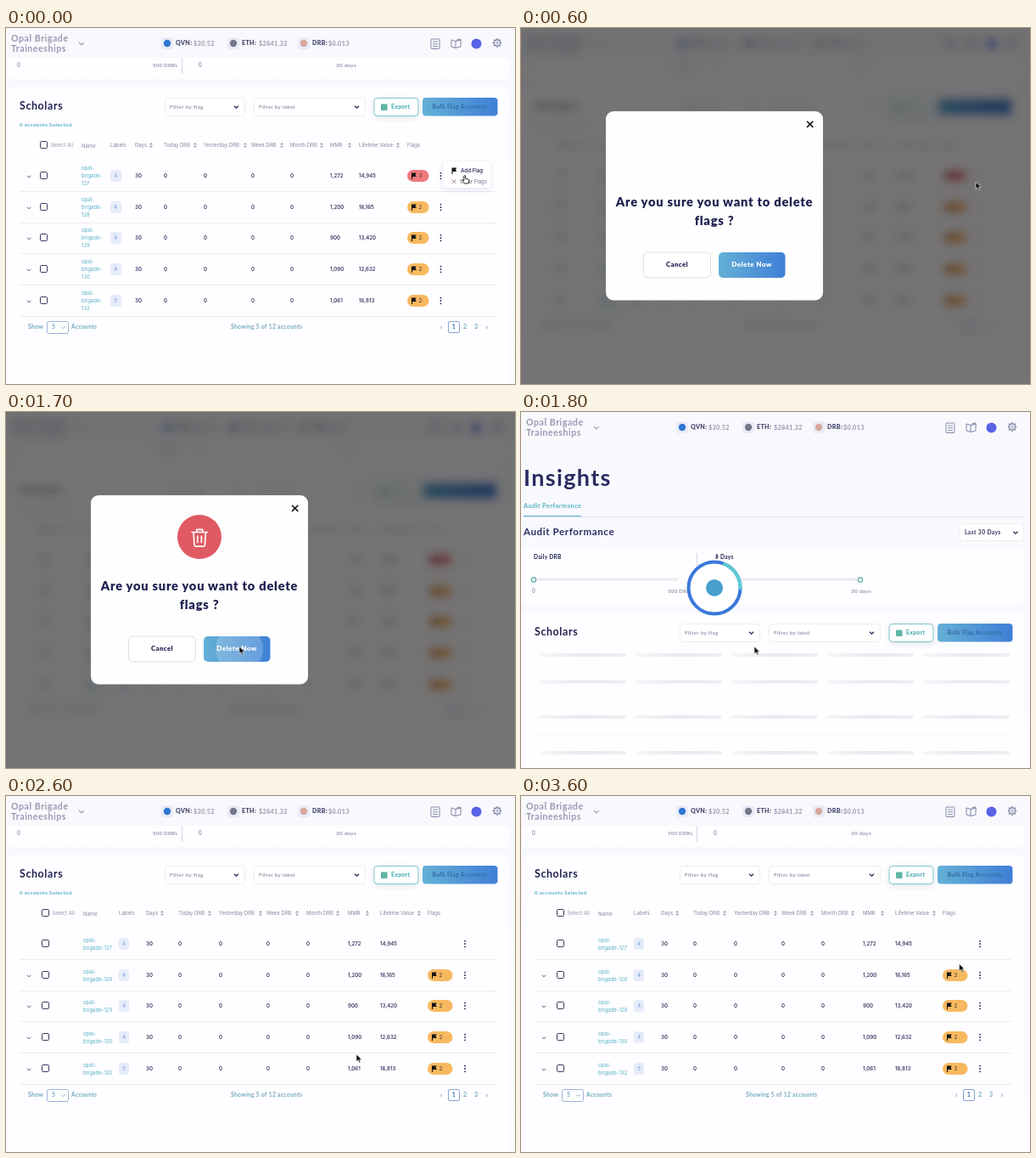
An HTML page for the animation above (3.7 s loop, 600 by 419 pixels).

```html
<!DOCTYPE html>
<html lang="en">
<head>
<meta charset="utf-8">
<title>Flag manager</title>
<style>
html, body { margin: 0; width: 100%; height: 100%; overflow: hidden; background: #fcfbff; }
svg { display: block; width: 600px; height: 419px; }
text { font-family: Inter, "Noto Sans", sans-serif; }
.h { font-family: Lato, "Open Sans", sans-serif; letter-spacing: .05em; }
</style>
</head>
<body>
<svg id="stage" viewBox="0 0 600 419"></svg>
<script>
const NAVY = '#1f2150', GRAY = '#9697ae', TEAL = '#55b2c6', PALE = '#ededf3';
const LOOP = 3700, STEP = 100, SCROLL = 167;

// Drawing helpers; text is centred vertically on y.
const text = (x, y, s, size, fill = NAVY, weight = 400, anchor = 'start', cls = '') =>
  `<text x="${x}" y="${y + size * 0.35}" font-size="${size}" fill="${fill}" font-weight="${weight}" text-anchor="${anchor}" class="${cls}">${s}</text>`;
const head = (x, y, s, size, fill, weight = 700, anchor) => text(x, y, s, size, fill, weight, anchor, 'h');
const rect = (x, y, w, h, r, fill, more = '') =>
  `<rect x="${x}" y="${y}" width="${w}" height="${h}" rx="${r}" fill="${fill}" ${more}/>`;
const circle = (x, y, r, fill, more = '') => `<circle cx="${x}" cy="${y}" r="${r}" fill="${fill}" ${more}/>`;
const line = (d, stroke, width = 1, more = '') =>
  `<path d="${d}" fill="none" stroke="${stroke}" stroke-width="${width}" ${more}/>`;
const shape = (d, fill) => `<path d="${d}" fill="${fill}"/>`;
const group = (id, body, more = '') => `<g id="${id}" ${more}>${body}</g>`;
const chevron = (x, y, color = NAVY, w = 2.5, thick = 1.2) =>
  line(`M${x - w} ${y - w / 2}l${w} ${w}l${w} ${-w}`, color, thick);
const flag = (x, y) => shape(`M${x} ${y - 3.5}h5.8l-1.3 2.2 1.3 2.2h-4.7v3h-1.1z`, '#161616');
const box = (x, y) => rect(x - 4, y - 4, 8, 8, 1, '#fff', 'stroke="#3b3c60"');
const dots = (x, y) => [-3.3, 0, 3.3].map(d => circle(x, y + d, 0.9, NAVY)).join('');
const cross = (x, y, r, color, width) =>
  line(`M${x - r} ${y - r}l${2 * r} ${2 * r}m0 ${-2 * r}l${-2 * r} ${2 * r}`, color, width);

const defs = `<defs>
  <linearGradient id="bg" x2="0" y2="1"><stop stop-color="#f7f8fd"/><stop offset="1" stop-color="#fcfbff"/></linearGradient>
  <linearGradient id="blue"><stop stop-color="#64b0d6"/><stop offset="1" stop-color="#3f7fd6"/></linearGradient>
  <linearGradient id="bone"><stop stop-color="#f6f5f9"/><stop offset=".5" stop-color="#e9e8ee"/><stop offset="1" stop-color="#efeef3"/></linearGradient>
  <filter id="blur" filterUnits="userSpaceOnUse" x="-20" y="-20" width="640" height="459"><feGaussianBlur stdDeviation="5.5"/></filter>
  <filter id="soft" x="-30%" y="-30%" width="160%" height="180%"><feDropShadow dx="0" dy="2" stdDeviation="3" flood-color="#4a4a80" flood-opacity=".14"/></filter>
  <clipPath id="press">${rect(233, 264, 78, 30, 5, '#fff')}</clipPath>
</defs>`;

function topBar() {
  const coin = (x, color, name, price, px) =>
    rect(x - 7, 11, 14, 14, 3, '#e9ecf6') + circle(x, 18, 4.2, color) +
    head(x + 10, 18, name + ':', 7.1, '#4a4b72', 900) + head(px, 18, price, 7.2, GRAY);
  const icon = '#8587a8';
  let gear = circle(579, 17.5, 3.6, 'none', `stroke="${icon}" stroke-width="1.1"`) +
    circle(579, 17.5, 1.4, 'none', `stroke="${icon}" stroke-width=".8"`);
  for (let a = 0; a < 360; a += 45)
    gear += line('M579 12.2v1.9', icon, 1.8, `transform="rotate(${a} 579 17.5)"`);
  return rect(0, 0, 600, 35, 0, '#f8f8fd') +
    head(6, 12, 'Opal Brigade', 10.6, '#9a9bb2') + head(6, 24, 'Traineeships', 10.6, '#9a9bb2') +
    chevron(89, 18.5, GRAY, 2.8) +
    coin(190, '#2f78d2', 'QVN', '$30.52', 221) +
    coin(268, '#77788a', 'ETH', '$2841.32', 298) +
    coin(351, '#d9a9a0', 'DRB', '$0.013', 380) +
    rect(501, 13, 10, 11.5, 1, 'none', `stroke="${icon}"`) +
    line('M503 16h6m-6 2.7h6m-6 2.7h6', icon, 0.9) +
    line('M530 15.5l-5-1.5v8l5 1.5 6-1.5v-8zv8m2-8v-2l4-.5v2', icon, 1) +
    circle(554.5, 18.5, 6, '#5a62e6') + gear;
}

function insights() {
  const track = x => rect(x, 195.5, 167, 3, 1.5, '#ebebf0');
  const knob = x => circle(x, 197.5, 2.6, '#fff', 'stroke="#57aaa8" stroke-width="1.2"');
  return head(3, 78, 'Insights', 27, '#2a2b61') +
    head(3, 110, 'Audit Performance', 7.4, TEAL) +
    line('M3 123.5H593', '#e3e6f1') + line('M3 122.5H71', TEAL) +
    head(3, 141, 'Audit Performance', 11.6, '#2a2b61') +
    rect(517.5, 131.5, 75, 20, 4, '#fff', `stroke="${PALE}"`) +
    head(523, 142, 'Last 30 Days', 6.8, '#34365f') + chevron(583, 142) +
    rect(2, 160, 591, 67, 4, '#fefdff') +
    head(15, 171, 'Daily DRB', 6.5, NAVY) + head(229, 171, '# Days', 6.5, NAVY) +
    line('M207.5 166V221', '#d5d6e0') +
    track(18) + track(232) + rect(390, 195.5, 8, 3, 1, '#ebebf0') + knob(15) + knob(400) +
    head(13, 211, '0', 6.5, GRAY) + head(173, 211, '500 DRBs', 6, GRAY) +
    head(227, 211, '0', 6.5, GRAY) + head(389, 211, '30 days', 6.4, GRAY);
}

function toolbar() {
  const filter = (x, w, s) => rect(x + 0.5, 82.5, w, 21, 4, '#fff', `stroke="${PALE}"`) +
    head(x + 6, 93, s, 6.4, GRAY) + chevron(x + w - 9.5, 93);
  return rect(2, 69, 591, 420, 5, '#fefdff') +
    head(16, 92, 'Scholars', 12.4, NAVY) +
    filter(187, 94, 'Filter by flag') + filter(292, 131, 'Filter by label') +
    rect(434, 82.5, 52, 21, 4, '#fff', 'stroke="#7fc6c8" filter="url(#soft)"') +
    rect(442, 89.5, 7.5, 7.5, 1, '#5fb5a5') + head(454, 93, 'Export', 6.7, '#5cb3b9', 900) +
    rect(491, 82, 88.5, 21.5, 4, 'url(#blue)') +
    head(535, 93, 'Bulk Flag Accounts', 6.9, '#3a72ab', 900, 'middle');
}

const LABELS = ['Labels', 'Days', 'Today DRB', 'Yesterday DRB', 'Week DRB', 'Month DRB', 'MMR', 'Lifetime Value', 'Flags'];
const SORT_AT = [0, 19, 37, 49, 36, 37, 23, 46, 0];
const ROWS = [
  ['127', 4, '1,272', '14,945', 3], ['128', 4, '1,200', '16,165', 2], ['129', 4, '900', '13,420', 2],
  ['130', 4, '1,090', '12,632', 2], ['132', 5, '1,061', '16,813', 2]];

// wide: two-line names and larger flags; otherwise the narrow layout beside the row menu.
function table(wide) {
  const cols = wide ? [133, 165, 203, 251, 307, 354, 403, 441, 497] : [123, 152, 186, 233, 289, 335, 382, 416, 473];
  const boxX = wide ? 46.5 : 44.5, nameX = wide ? 91 : 89, dotX = wide ? 541 : 512.5;
  const label = '#85879f';
  let out = head(16, 114, '0 accounts Selected', 6.3, TEAL) + box(boxX, 137.5) +
    text(boxX + 8, 138, 'Select All', 6, GRAY) + text(nameX, 139, 'Name', 6, label);
  LABELS.forEach((s, i) => {
    const x = cols[i], sx = x + SORT_AT[i];
    out += text(x, 138, s, 6, label);
    if (SORT_AT[i]) out += shape(`M${sx - 2} 137.3l2-2.3 2 2.3zm0 1.4l2 2.3 2-2.3z`, GRAY);
  });
  ROWS.forEach(([id, labels, mmr, total, flags], i) => {
    const y = Math.round(174 + 36.7 * i);
    const name = wide ? ['opal-', 'brigade-' + id] : ['opal-', 'brigade-', id];
    const first = i === 0;
    if (!wide || !first) out += chevron(27, y + 0.8, '#55577a', 2.1, 1);
    out += box(boxX, y - 0.5);
    name.forEach((s, k) => out += text(nameX, y + (k - (name.length - 1) / 2) * 9, s, 6, TEAL));
    out += rect(cols[0], y - 7, wide ? 12 : 13, 14, 3, '#e6ecfa') +
      text(cols[0] + 6.2, y, labels, 6, '#6d97d8', 400, 'middle');
    ['30', '0', '0', '0', '0', mmr, total].forEach((s, k) => out += text(cols[k + 1], y, s, 6.2, NAVY, 500));
    const pill = rect(cols[8], y - 7, wide ? 29.5 : 25.5, 14, 7, first ? '#ee7a7f' : '#f7b95f') +
      flag(cols[8] + 5, y) + text(cols[8] + 13.5, y, flags, 6.5, '#3b3040');
    out += wide && first ? group('firstPill', pill) : pill;
    out += dots(dotX, y) + (i < 4 ? line(`M16 ${y + 18.5}H578`, '#f0eaf1') : '');
  });
  const foot = '#6fa6bf';
  return out + line('M16 339.5H578', '#efebf2') +
    head(26, 352, 'Show', 6.8, foot) + rect(48.5, 345.5, 25, 14, 2, '#fff', 'stroke="#9db3d9"') +
    head(54, 352, '5', 6.8, foot) + chevron(67.5, 352.5, foot, 2.2, 0.9) + head(77, 352, 'Accounts', 6.7, foot) +
    head(265, 352, 'Showing 5 of 12 accounts', 6.7, foot) +
    head(512, 352, '‹', 9, foot) + rect(521.5, 345.5, 13, 13, 1.5, '#fff', 'stroke="#7fa2d4"') +
    head(528, 352, '1', 7, '#3e6fb8', 700, 'middle') + head(539, 352, '2', 7, foot) +
    head(552, 352, '3', 7, foot) + head(565.5, 352, '›', 9, foot);
}

function skeleton() {
  let out = '';
  [286, 317.5, 359, 401].forEach((y, i) => {
    for (let k = 0; k < 5; k++) out += rect(22 + 113 * k, y - 2, 102, 4, 2, 'url(#bone)');
    out += line(`M16 ${[298.5, 338.5, 380.5, 418.5][i]}H578`, '#f9f7fb');
  });
  return out;
}

const menu = rect(516, 157, 55, 31, 3, '#fff', 'filter="url(#soft)"') +
  flag(525.5, 168) + text(536, 167.5, 'Add Flag', 6.2, NAVY, 500) +
  group('clear', line('M525.5 178.2l5 5m0-5l-5 5', '#d3545b', 1, 'id="clearMark"') +
    text(535, 181, 'Clear Flags', 6, 'currentColor'));

const trash = circle(228, 147, 26, '#df5a62') +
  line('M219 141.5h18.5m-12.7 0v-3.2h7v3.2m-10.8 0l1 15q.1 1.7 2 1.7h8.4q1.9 0 2-1.7l1-15m-9.6 4.5v7.5m4.6-7.5v7.5',
    '#fff', 1.7, 'stroke-linecap="round" stroke-linejoin="round"');

const modal = rect(0, 0, 600, 419, 0, '#000', 'opacity=".54"') +
  rect(100, 98, 256, 222.5, 9, '#fffeff') + cross(340.7, 113.3, 3.6, '#111', 1.6) +
  group('trash', trash) +
  head(228, 205, 'Are you sure you want to delete', 14.7, NAVY, 900, 'middle') +
  head(228, 226.5, 'flags ?', 14.7, NAVY, 900, 'middle') +
  rect(144.5, 264, 79, 30, 5, '#fff', 'stroke="#dddde6"') + head(184, 278.5, 'Cancel', 7.8, NAVY, 900, 'middle') +
  rect(233, 264, 78.5, 30, 5, 'url(#blue)') +
  `<g clip-path="url(#press)">${circle(275, 279, 0, '#fff', 'id="ripple" opacity=".2"')}</g>` +
  head(272, 278.5, 'Delete Now', 8.1, '#fff', 900, 'middle');

const loader = circle(228, 207, 33, '#fff') +
  circle(228, 207, 30.5, 'none', 'stroke="#3a78dc" stroke-width="4"') +
  group('arc', line('M238.4 178.3A30.5 30.5 0 0 1 258.5 209', '#60cad2', 4)) +
  circle(228, 207, 10, '#479fce');

const arrow = '<path id="arrow" d="M0 0v8.6l2-1.8 1.5 3.1 1.5-.7-1.4-3h2.8z" fill="#111" stroke="#fff" stroke-width=".6"/>';
const hand = '<path id="hand" d="M-1.2-4q1-1 1.8 0v3.2l3.5.8q1 .3.8 1.6l-.7 3.4h-4.7l-2.9-3.4q.2-1.2 1.3-.6l.9.7z" fill="#fff" stroke="#111" stroke-width=".9"/>';

document.getElementById('stage').innerHTML = defs + group('page',
  rect(-20, -20, 640, 459, 0, 'url(#bg)') +
  group('content', insights() + group('sheet', toolbar() + group('narrow', table(false) + menu) +
    group('wide', table(true)), `transform="translate(0 ${SCROLL})"`) + group('skeleton', skeleton())) +
  topBar()) + group('modal', modal) + group('loader', loader) + arrow + hand;

const $ = id => document.getElementById(id);
const show = (id, on) => $(id).style.display = on ? '' : 'none';
const clamp = v => Math.max(0, Math.min(1, v));

// Pointer path: time, x, y
const PATH = [
  [0, 541, 178], [200, 540, 180], [500, 537.5, 185.5], [600, 536, 181], [700, 530, 184], [1300, 277, 277],
  [1500, 275, 276], [1800, 275, 276], [2600, 413, 304], [2900, 97, 341], [3100, 97, 341], [3600, 516.5, 197.5]];

function pointer(t) {
  const i = PATH.findIndex(p => p[0] > t);
  if (i < 0) return PATH[PATH.length - 1].slice(1);
  const [t0, x0, y0] = PATH[i - 1], [t1, x1, y1] = PATH[i];
  const k = (t - t0) / (t1 - t0), e = k * k * (3 - 2 * k);
  return [x0 + (x1 - x0) * e, y0 + (y1 - y0) * e];
}

function draw(now) {
  const t = Math.floor(now % LOOP / STEP) * STEP;
  const asking = t >= 600 && t < 1800, loading = t >= 1800 && t < 2500;
  show('narrow', t < 600);
  show('wide', t >= 600 && !loading);
  show('firstPill', asking);
  show('skeleton', loading);
  show('loader', loading);
  show('modal', asking);
  $('content').setAttribute('transform', `translate(0 ${loading ? 0 : -SCROLL})`);
  asking ? $('page').setAttribute('filter', 'url(#blur)') : $('page').removeAttribute('filter');

  const hover = t >= 200;
  $('clear').style.color = hover ? '#3f83b8' : '#6c7090';
  $('clearMark').setAttribute('stroke', hover ? '#d3545b' : '#a08080');

  const pop = 1 - (1 - clamp((t - 600) / 400)) ** 3;
  $('trash').setAttribute('transform', `translate(228 147) scale(${pop}) translate(-228 -147)`);
  $('ripple').setAttribute('r', 28 * clamp((t - 1500) / 200));
  $('arc').setAttribute('transform', `rotate(${(t - 1800) * 0.24} 228 207)`);

  const at = `translate(${pointer(t)})`;
  show('hand', t < 600);
  show('arrow', t >= 600);
  $('hand').setAttribute('transform', at);
  $('arrow').setAttribute('transform', at);
}

const start = performance.now();
(function tick() {
  draw(performance.now() - start);
  requestAnimationFrame(tick);
})();
</script>
</body>
</html>
```
